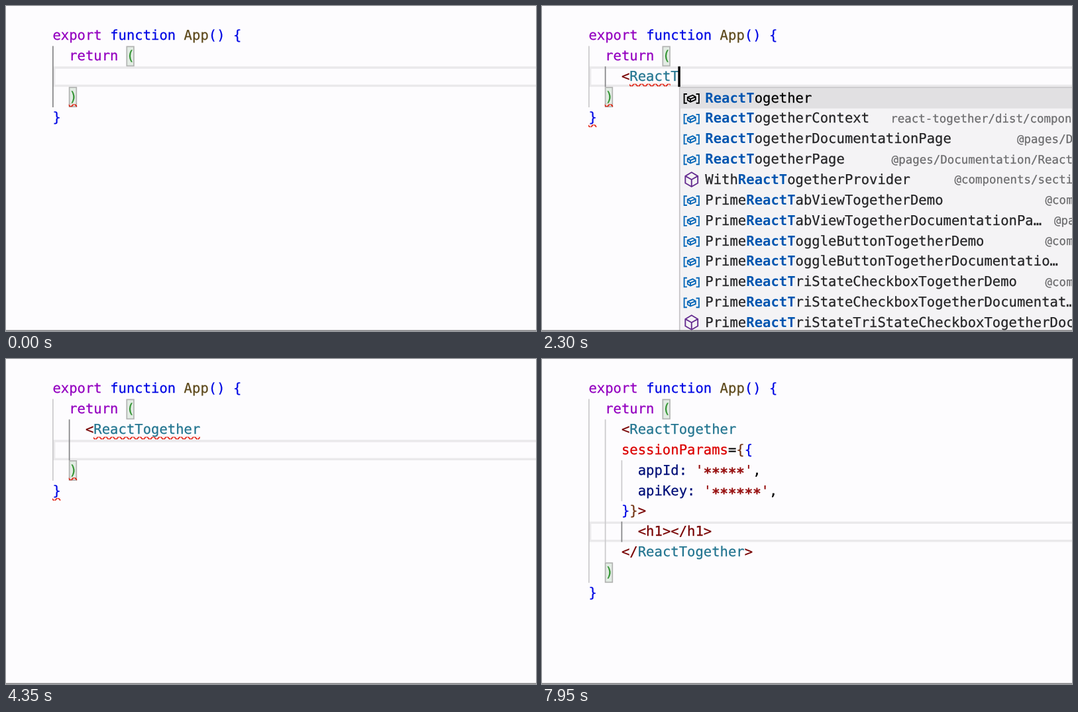
Write an HTML page that moves like this. It is 800 by 491 pixels and loops after 8000 ms.

```html
<!DOCTYPE html>
<html lang="en">
<head>
<meta charset="utf-8">
<title>Code editor</title>
<style>
  html, body { margin: 0; width: 100%; height: 100%; overflow: hidden; background: #fdfcfe; }
  svg { display: block; width: 800px; height: 491px; }
  text {
    font: 12px "DejaVu Sans Mono", monospace; white-space: pre; text-rendering: geometricPrecision;
    fill: currentColor; stroke: currentColor; stroke-width: .16px;
  }
  tspan { fill: currentColor; stroke: currentColor; }
  .detail { font-size: 10.2px; color: #6c6c6e; }
  .hit { font-weight: bold; color: #0055b0; stroke-width: 0; }
</style>
</head>
<body>
<svg id="stage" viewBox="0 0 466.667 286.417">
  <defs>
    <pattern id="wave" width="6" height="3" patternUnits="userSpaceOnUse">
      <path fill="#e01000" d="M5.5 0 2.5 3H1.1L4.1 0ZM4 0 6 2V.6L5.4 0ZM0 2 1 3H2.4L0 .6Z"/>
    </pattern>
    <g id="variable" fill="none" stroke-width="1.1">
      <path d="M4 4.5H1.5V12.5H4M12 4.5H14.5V12.5H12"/>
      <path d="M4.5 7.4 9 5.5 11.5 7V9.6L7 11.5 4.5 10ZM4.5 7.4 7 8.9 11.5 7M7 8.9V11.5"/>
    </g>
    <path id="cube" fill="none" stroke-width="1.1"
      d="M8 1.5 13.5 4.8V11L8 14.2 2.5 11V4.8ZM2.5 4.8 8 7.9 13.5 4.8M8 7.9V14.2"/>
  </defs>
  <g id="view"></g>
  <rect y="285.6" width="467" height="1" fill="#7c7c7e"/>
</svg>
<script>
const LOOP = 8000, BLINK = 200;
const LEFT = 40.83, TOP = 17.27, CHAR = 7.224, LINE = 18, BASE = 12.65;
const colX = c => LEFT + c * CHAR;
const rowY = r => TOP + r * LINE;

const STYLE = {
  k: 'color="#9400c0"', b: 'color="#0008e4"', f: 'color="#5e4a1c"', g: 'color="#319331"',
  m: 'color="#780000"', t: 'color="#237590"', r: 'color="#dc0000"', o: 'color="#000"',
  n: 'color="#733514"', v: 'color="#000f78"', s: 'color="#981212"', e: 'color="#f03838"',
  star: 'color="#981212" font-weight="bold" dy="2.4"', end: 'color="#981212" dy="-2.4"'
};

// Completion lists: label, then an optional detail and its offset; * marks the cube icon.
const GLOBALS = `*App
ReactTogether
arguments
AbortController
AbortSignal
AbstractRange
AggregateError
AnalyserNode
Animation
AnimationEffect
AnimationEvent
AnimationTimeline`;
const RTC = 'ReactTogether\n' + ['Certificate', 'DTMFSender', 'DTMFToneChangeEvent', 'DataChannel',
  'DataChannelEvent', 'DtlsTransport', 'EncodedAudioFrame', 'EncodedVideoFrame', 'Error',
  'ErrorEvent', 'IceCandidate'].map(n => 'RTC' + n).join('\n');
const TOGETHER = `ReactTogether
ReactTogetherContext react-together/dist/components 186.7
ReactTogetherDocumentationPage @pages/Documentation 298
ReactTogetherPage @pages/Documentation/ReactTogether 187.5
*WithReactTogetherProvider @components/sections 242.8
`;
const REACT_T = TOGETHER + `PrimeReactTabViewTogetherDemo @components 322.8
PrimeReactTabViewTogetherDocumentationPa… @pages 330.6
PrimeReactToggleButtonTogetherDemo @components 322.8
PrimeReactToggleButtonTogetherDocumentatio…
PrimeReactTriStateCheckboxTogetherDemo @components 322.8
PrimeReactTriStateCheckboxTogetherDocumentat…
*PrimeReactTriStateTriStateCheckboxTogetherDocu…`;
const REACT_FULL = TOGETHER + `PrimeReactKnobTogetherDemo
PrimeReactKnobTogetherDocumentationPage
PrimeReactRatingTogetherDemo
PrimeReactRatingTogetherDocumentationPage
PrimeReactTabViewTogetherDemo
PrimeReactTabViewTogetherDocumentationPa…
PrimeReactCalendarTogetherDemo`;
const HEADINGS = 'h1\nh2\nh3\nh4\nh5\nh6';

// A line is [indent, "style~text~style~text…"].
const wrap = body => [
  [0, 'k~export ~b~function ~f~App~b~() {'], [2, 'k~return ~g~('],
  ...body, [2, 'g~)'], [0, 'b~}']
];
const OPEN = [4, 'm~<~t~ReactTogether'];
const PARAMS = [
  [4, 'r~sessionParams~o~=~n~{~b~{'],
  [6, "v~appId: ~s~'~star~*****~end~'~o~,"],
  [6, "v~apiKey: ~s~'~star~******~end~'~o~,"]
];
const CLOSE = 'm~</~t~ReactTogether~m~>';

const states = [];
// guides: [column, row, count, active]; waves: [row, column, length]
function add(time, body, row, col, more) {
  const rows = wrap(body), last = rows.length - 2;
  states.push({ time, rows, row, col, guides: [], waves: [], list: '', typed: '',
    match: [[1, 9], [last, 2]], ...more });
}

add(50, [[4, 'o~']], 2, 4, { guides: [[0, 1, 3, 1]], waves: [[3, 2, 1]] });

const NAME = 'ReactTogether';
const tagGuides = [[0, 1, 3], [2, 2, 1, 1]];
[850, 1300, 1550, 1700, 1850, 2000, 2250, 2400, 2550, 2650, 2800, 2900, 3050, 3150].forEach((time, n) => {
  const typed = NAME.slice(0, n);
  add(time, [[4, n ? 'm~<~t~' + typed : 'e~<']], 2, 5 + n, {
    guides: tagGuides, typed,
    waves: [[3, 2, 1], n < 2 ? [2, 4, 1] : [2, 5, n - 1], ...(n > 1 ? [[4, 0, 1]] : [])],
    list: n < 1 ? GLOBALS : n < 2 ? RTC : n < 7 ? REACT_T : REACT_FULL
  });
});
const tagWaves = [[2, 5, 13], [3, 2, 1], [4, 0, 1]];
add(3200, [OPEN], 2, 18, { guides: tagGuides, waves: tagWaves, typed: NAME, list: REACT_FULL });
add(3850, [OPEN], 2, 18, { guides: tagGuides, waves: tagWaves });
add(4100, [OPEN, [4, 'o~']], 3, 4, {
  guides: [[0, 1, 4], [2, 2, 2, 1]], waves: [[2, 5, 13], [4, 2, 1], [5, 0, 1]]
});

const pasted = [[0, 1, 7], [2, 2, 5, 1], [4, 4, 2]];
add(4600, [OPEN, ...PARAMS, [4, 'b~}~n~}']], 6, 6, {
  guides: pasted, waves: [[7, 2, 1], [8, 0, 1]], match: [[3, 18], [6, 5]]
});
add(4950, [OPEN, ...PARAMS, [4, 'b~}~n~}~m~>~' + CLOSE]], 6, 7, { guides: pasted });

function child(time, code, col, more) {
  add(time, [OPEN, ...PARAMS, [4, 'b~}~n~}~m~>'], [6, code], [4, CLOSE]], 7, col, {
    guides: [[0, 1, 9], [2, 2, 7], [4, 4, 2], [4, 7, 1, 1]], ...more
  });
}
const closeWave = [[8, 4, 2]];
child(5300, 'o~', 6);
child(6050, 'e~<', 7, { waves: closeWave, list: GLOBALS });
child(6600, 'm~<h', 8, { waves: closeWave, list: HEADINGS + '\nhead\nheader', typed: 'h' });
child(7100, 'm~<h1', 9, { waves: closeWave, list: HEADINGS, typed: 'h1' });
child(7700, 'm~<h1></h1>', 10);

const escape = s => s.replace(/&/g, '&amp;').replace(/</g, '&lt;');
const rect = (x, y, w, h, attrs) => `<rect x="${x}" y="${y}" width="${w}" height="${h}" ${attrs}/>`;

function drawLine([indent, code], row) {
  const parts = code.split('~');
  let spans = '';
  for (let i = 0; i < parts.length; i += 2) spans += `<tspan ${STYLE[parts[i]]}>${escape(parts[i + 1])}</tspan>`;
  return `<text x="${colX(indent) + .25}" y="${rowY(row) + BASE}">${spans}</text>`;
}

function highlight(name, typed) {
  const parts = name.includes(typed) ? [typed] : ['React', typed.slice(5)];
  let out = '', from = 0;
  for (const part of parts) {
    const at = part ? name.indexOf(part, from) : -1;
    if (at < 0) continue;
    out += name.slice(from, at) + `<tspan class="hit">${part}</tspan>`;
    from = at + part.length;
  }
  return out + name.slice(from);
}

function drawPopup({ list, typed, row, col }) {
  if (!list) return '';
  const items = list.split('\n'), x = colX(col) + .4, top = rowY(row + 1) + 1;
  let out = rect(x + .5, top - .5, 600, items.length * LINE + 1, 'fill="#f4f3f5" stroke="#c5c4c7"');
  out += rect(x + 1, top, 600, LINE, 'fill="#e1e0e2"');
  items.forEach((item, i) => {
    const [label, detail, offset] = item.split(' ');
    const cube = label[0] === '*', y = top + i * LINE;
    const color = !i ? '#000' : cube ? '#652d90' : '#0868b8';
    out += `<use href="#${cube ? 'cube' : 'variable'}" x="${x + 3}" y="${y + .8}" stroke="${color}"/>`;
    out += `<text x="${x + 23}" y="${y + BASE}" color="${i ? '#252527' : '#000'}">${highlight(label.replace('*', ''), typed)}</text>`;
    if (detail) out += `<text class="detail" x="${colX(col) + +offset}" y="${y + BASE - .3}">${detail}</text>`;
  });
  return out;
}

function draw(s, cursorOn) {
  let out = rect(LEFT + 1.5, rowY(s.row) + 1, 600, LINE - 2, 'fill="none" stroke="#eae9eb" stroke-width="2"');
  for (const [col, row, count, active] of s.guides)
    out += rect(colX(col), rowY(row), 1, count * LINE, `fill="${active ? '#858587' : '#cbcacc'}"`);
  for (const [row, col] of s.match)
    out += rect(colX(col) + .5, rowY(row) + .5, CHAR - 1, LINE - 1, 'fill="#006400" fill-opacity=".1" stroke="#b2b3b2"');
  out += s.rows.map(drawLine).join('');
  for (const [row, col, len] of s.waves)
    out += `<g transform="translate(${colX(col)} ${rowY(row + 1) - 3.2})">${rect(0, 0, len * CHAR, 3, 'fill="url(#wave)"')}</g>`;
  if (cursorOn) out += rect(colX(s.col) - .5, rowY(s.row), 2, LINE, 'fill="#000"');
  return out + drawPopup(s);
}

const view = document.getElementById('view'), start = performance.now();
let shown = '';
function tick(now) {
  const t = Math.max(0, now - start) % LOOP;
  let index = 0;
  while (index + 1 < states.length && states[index + 1].time <= t) index++;
  const state = states[index];
  const cursorOn = Math.floor((t - state.time) / BLINK) % 2 === 0;
  const key = index + ':' + cursorOn;
  if (key !== shown) {
    view.innerHTML = draw(state, cursorOn);
    shown = key;
  }
  requestAnimationFrame(tick);
}
tick(start);
</script>
</body>
</html>
```
